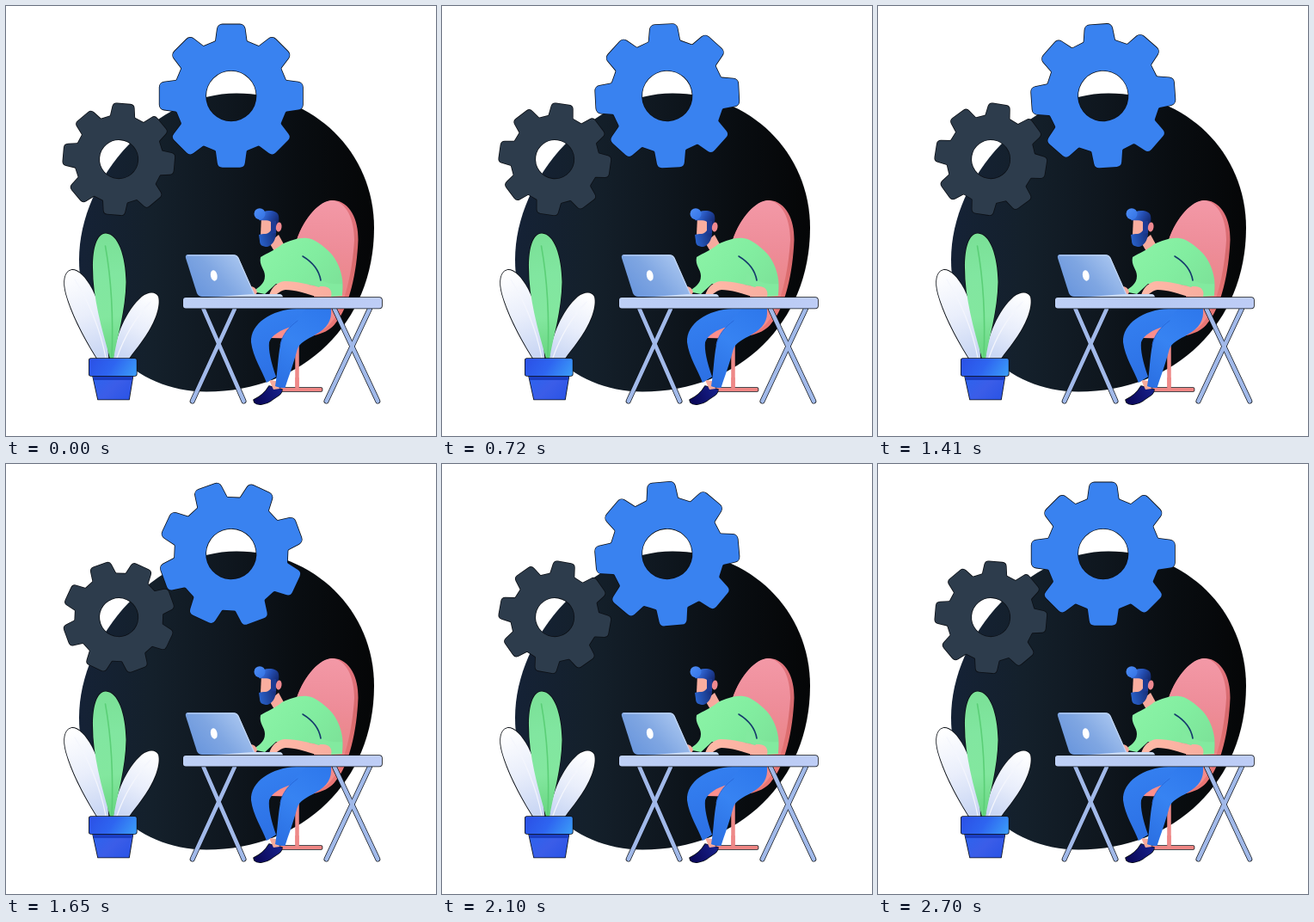
Recreate the animation shown at these times as an HTML page with a canvas. Size 500 px wide and 500 px high, loop 2730 ms.

```html
<!DOCTYPE html>
<html lang="en">
<head>
<meta charset="utf-8">
<title>Desk work</title>
<style>
html, body { margin: 0; width: 100%; height: 100%; overflow: hidden; background: #fff; }
canvas { display: block; width: 500px; height: 500px; }
</style>
</head>
<body>
<canvas id="stage" width="500" height="500"></canvas>
<script>
const ctx = document.getElementById('stage').getContext('2d');
const LOOP = 2730, STEP = 30, TURN_PER_STEP = 2;
const EDGE = '#0c1016';
const start = performance.now();

function blend(x0, y0, x1, y1, ...colors) {
  const g = ctx.createLinearGradient(x0, y0, x1, y1);
  colors.forEach((c, i) => g.addColorStop(i / (colors.length - 1), c));
  return g;
}

const toPath = path => typeof path === 'string' ? new Path2D(path) : path;

// Thin dark rim; later fills cover its inner half.
function rim(path) {
  ctx.strokeStyle = EDGE;
  ctx.lineWidth = 1.6;
  ctx.lineJoin = 'round';
  ctx.stroke(toPath(path));
}

function shape(path, fill, outlined = false) {
  if (outlined) rim(path);
  ctx.fillStyle = fill;
  ctx.fill(toPath(path), 'evenodd');
}

function line(d, color, width, cap = 'round') {
  ctx.strokeStyle = color;
  ctx.lineWidth = width;
  ctx.lineCap = cap;
  ctx.stroke(new Path2D(d));
}

function ellipse(x, y, rx, ry, fill, angle = 0) {
  ctx.beginPath();
  ctx.ellipse(x, y, rx, ry, angle, 0, Math.PI * 2);
  ctx.fillStyle = fill;
  ctx.fill();
}

function box(x, y, w, h, r, fill, outlined) {
  const p = new Path2D();
  p.roundRect(x, y, w, h, r);
  shape(p, fill, outlined);
}

// Eight-toothed wheel with rounded corners and an open hub.
function gearPath(scale) {
  const tooth = [[-18, -63.5, 2], [-15.3, -83.2, 6], [15.3, -83.2, 6], [18, -63.5, 2]];
  const points = [];
  for (let i = 0; i < 8; i++) {
    const c = Math.cos(i * Math.PI / 4), s = Math.sin(i * Math.PI / 4);
    for (const [x, y, r] of tooth) {
      points.push([(x * c - y * s) * scale, (x * s + y * c) * scale, r * scale]);
    }
  }
  const p = new Path2D();
  const last = points[points.length - 1];
  p.moveTo((last[0] + points[0][0]) / 2, (last[1] + points[0][1]) / 2);
  points.forEach(([x, y, r], i) => {
    const next = points[(i + 1) % points.length];
    p.arcTo(x, y, next[0], next[1], r);
  });
  p.closePath();
  p.moveTo(29.6 * scale, 0);
  p.arc(0, 0, 29.6 * scale, 0, Math.PI * 2);
  return p;
}

const bigGear = gearPath(1), smallGear = gearPath(0.775);

function gear(path, x, y, degrees, fill) {
  ctx.save();
  ctx.translate(x, y);
  ctx.rotate(degrees * Math.PI / 180);
  shape(path, fill, true);
  ctx.restore();
}

function backdrop() {
  shape('M85 295C85 198 176 101.5 268 101.5C358 101.5 428 170 428 258C428 368 346 448.5 233 448.5C149 448.5 85 382 85 295Z',
    blend(85, 0, 428, 0, '#152236', '#14202b', '#0f171f', '#090d11', '#050607'));
}

function plant() {
  const left = 'M119 410C119 388 113 355 100 329C92 314 83 306 76 307C68 309 66 320 70 335C77 360 94 391 106 410Z';
  const right = 'M125 410C127 384 140 354 158 338C166 332 174 332 177 338C180 349 173 368 162 384C154 396 147 404 143 410Z';
  const middle = 'M121 410C111 374 101 340 101 304C101 280 106 265 116 264.5C130 265 139 290 139.5 321C139 354 129 386 125 410Z';
  [left, right, middle].forEach(rim);
  shape(left, blend(75, 310, 112, 410, '#ffffff', '#e9eefb', '#c6d4f3'));
  line('M80 318C96 343 110 377 116 409', '#f4f6fd', 1.2);
  shape(right, blend(168, 335, 130, 410, '#ffffff', '#e9eefb', '#c6d4f3'));
  line('M168 344C150 363 137 386 129 409', '#f4f6fd', 1.2);
  shape(middle, blend(108, 265, 126, 410, '#7ae096', '#81e6a0', '#83e79f', '#66d47f'));
  line('M115.5 279C122 315 125 360 123 409', '#5bcf77', 1.6);
  shape('M101 430H147.5L143 457.5H107Z', blend(108, 432, 136, 460, '#2f62ed', '#3b5de8', '#2d55e6'), true);
  shape('M101 430H147.5L146.8 435H102Z', '#1b3ec2');
  box(96.8, 410, 55, 20, 2, blend(102, 405, 145, 434, '#2b51e6', '#2e65f0', '#3a98f7'), true);
}

function chair() {
  shape('M338 272C347 246 365 226 381 226C400 227 410 249 409.5 272C408 310 399 351 383 369C373 383 348 388 308 386L312 378L362 350Z',
    blend(380, 230, 395, 350, '#e57680', '#d5686c', '#ea7675'));
  shape('M338 272C347 246 365 226 379 226C396 227 405 249 405 272C403 308 394 350 379 367C368 382 346 387 308 386L312 378L362 350Z',
    blend(375, 228, 366, 385, '#f398a6', '#ee8d99', '#ea8587', '#fb8f8d'));
  line('M338.5 387V445', '#ee8988', 4.5, 'butt');
  box(312, 444, 55.5, 4, 1, '#ef8583', true);
  line('M338.5 432V446', '#ee8988', 4.5, 'butt');
}

function trousers() {
  shape('M288 458C295 455 302 449 306 442L321 446C321 452 314 454 308 459C302 463 293 465 289 461Z',
    blend(290, 460, 320, 445, '#0a0757', '#17218c'), true);
  shape('M306 435L315 436L318 445L311 446Z', '#f7aa9b');
  shape('M338 352C309 353 284 369 285 391C287 408 298 424 303 438L314 431C308 414 305 400 306 391C309 383 318 377 334 372L364 352Z',
    blend(288, 365, 313, 435, '#347ff0', '#2c70e4'));
  shape('M378 352C379 366 374 374 360 382C350 388 341 391 338.5 400C334 417 329 430 324.5 444C320 444 316 443.5 313 442C316 425 316 409 319 394C321 381 335 367 349 352Z',
    blend(375, 355, 317, 440, '#2e78ec', '#3783f2', '#2b70e3'));
  line('M319 394C321 383 328 374 339 366', '#2868d9', 1);
}

function torso() {
  shape('M306 275L317 266L323 277L313 287Z', '#f6aa9e');
  shape('M296 292C304 287 313 284 321 277C330 273 341 269 350 270C359 271 366 277 373 283C386 294 394 314 391 335L376 336L358 325L314 323L301 335L287 332C294 327 301 323 301 314C301 306 294 302 296 292Z',
    blend(310, 282, 375, 335, '#89f2a5', '#82eda0', '#7de399'));
  // far hand, then the near forearm and its sleeve
  shape('M282 327C286 325 291 327 292 333L290 336H284Z', '#f6aa9e');
  shape('M306 336C309 327 315 321 324 320C340 320 352 324 364 327C371 320 382 321 379 333L379 340H366C350 334 335 330 325 330C318 331 316 335 312 337Z',
    blend(310, 325, 380, 335, '#ffb9a7', '#f8ad9f'));
  shape('M354 308C361 318 374 325 391 323V337L378 338C380 331 376 325 366 326L352 323Z', '#82ea9f');
  line('M345 291C355 297 364 307 366 319', '#143a6c', 1.6);
}

function head() {
  shape('M297 245H314L313 268L304 274L296 266Z', '#f9ae9f');
  shape('M300 239C306 237 316 238 317 244C318 248 317 253 315 256L311 262L308 261V251C304 248 298 250 294 249Z',
    blend(296, 240, 317, 252, '#3f7cec', '#234caf', '#132668'));
  shape('M294 266C299 264 304 267 308 261L314 260C315 269 311 278 304 280C298 280 295 278 295 273Z',
    blend(295, 272, 314, 268, '#2961c9', '#17307c'));
  shape('M308 250H314L314 264L308 265Z', '#1d3b94');
  ellipse(295, 241.7, 6.5, 6.5, blend(289, 237, 302, 247, '#4d8df7', '#3472e3'));
  ellipse(317.2, 257, 3.3, 5.5, '#ef8990', 0.15);
}

function laptop() {
  shape('M212 289H264Q268 289 270 292L290 338H228Q224 338 222 334L209 293Q208 289 212 289Z',
    blend(218, 338, 272, 290, '#6794dc', '#7fa6e2', '#a9c6f0'));
  line('M211 290H266Q268 290 270 293L289 336', '#c2d6f5', 1.2);
  ellipse(241.8, 313.4, 3.8, 6.3, '#ffffff', -0.2);
  shape('M285 335L318 335Q322 335 322 339.5H228Z', '#c8d9f7');
}

function desk() {
  const legs = ['M229.5 352L276.5 459.5', 'M266 352L216.7 459.5', 'M381.8 352L432.3 459.5', 'M423 352L372.5 459.5'];
  for (const leg of legs) line(leg, EDGE, 6);
  for (const leg of legs) line(leg, '#a1b9e9', 4.6);
  box(206, 339, 231, 12.5, 3, blend(205, 0, 438, 0, '#bed0f6', '#b7c9f2', '#becdf6'), true);
}

function draw() {
  const time = (performance.now() - start) % LOOP;
  const turn = Math.floor(time / STEP) * TURN_PER_STEP;
  ctx.fillStyle = '#fff';
  ctx.fillRect(0, 0, 500, 500);
  backdrop();
  gear(smallGear, 131.2, 178.2, 5 + turn, '#2d3c4c');
  gear(bigGear, 261.8, 104.6, -turn, '#3982f0');
  plant();
  chair();
  trousers();
  torso();
  head();
  laptop();
  desk();
  requestAnimationFrame(draw);
}
draw();
</script>
</body>
</html>
```
